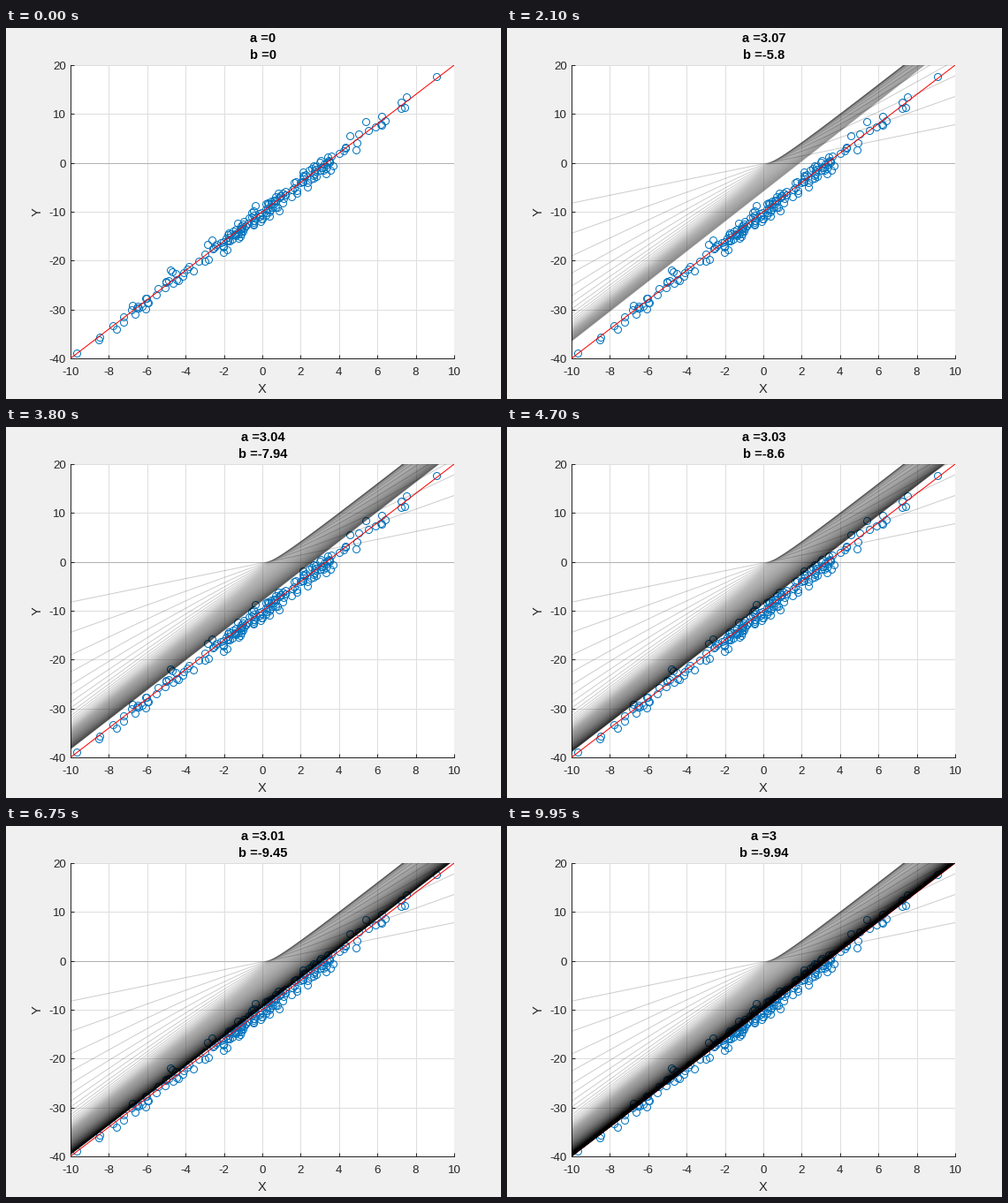
Recreate the animation shown at these times as a matplotlib script. Size 560 by 420 pixels, loop 10000 ms.

```python
import numpy as np
import matplotlib.pyplot as plt
from matplotlib.animation import FuncAnimation
from matplotlib.collections import LineCollection

W, H = 560, 420
LEFT, RIGHT, TOP, BOTTOM = 73, 507, 42, 374
PX = 0.72  # points per pixel at 100 dpi
FRAMES, INTERVAL = 200, 50
RATE = 0.02
INK = (0.15, 0.15, 0.15)
BLUE = (0, 0.447, 0.741)

plt.rcParams["font.family"] = "Liberation Sans"
fig = plt.figure(figsize=(W / 100, H / 100), dpi=100, facecolor="#f0f0f0")
ax = fig.add_axes([LEFT / W, 1 - BOTTOM / H,
                   (RIGHT - LEFT) / W, (BOTTOM - TOP) / H])
ax.set(xlim=(-10, 10), ylim=(-40, 20),
       xticks=range(-10, 11, 2), yticks=range(-40, 21, 10))
ax.set_axisbelow(True)
ax.grid(color="#dedede", linewidth=PX)
ax.tick_params(direction="in", length=4.3 * PX, width=PX, color=INK,
               labelbottom=False, labelleft=False)
for side in ("top", "right"):
    ax.spines[side].set_visible(False)
for side in ("left", "bottom"):
    ax.spines[side].set(color=INK, linewidth=PX)


def label(x, y, text, size, ha="center", **style):
    """Put text with its baseline at stage pixel (x, y)."""
    style = {"color": INK, **style}
    return fig.text(x / W, 1 - y / H, text, fontsize=size * PX, ha=ha,
                    va="baseline", rotation_mode="anchor", **style)


for v in range(-10, 11, 2):
    label(LEFT + (v + 10) / 20 * (RIGHT - LEFT), 393, str(v), 13.33)
for v in range(-40, 21, 10):
    label(68, TOP + (20 - v) / 60 * (BOTTOM - TOP) + 5, str(v), 13.33, "right")
label(290, 413, "X", 14.67)
label(40, 208.5, "Y", 14.67, rotation=90)
title_a = label(290.7, 16, "", 14.67, color="black", weight="bold")
title_b = label(290.7, 35, "", 14.67, color="black", weight="bold")


def make_samples(n=200, slope=3.0015, offset=-10.118):
    """Noisy line whose least-squares fit is exactly (slope, offset)."""
    rng = np.random.default_rng(7)
    x = rng.uniform(-1, 1, (n, 4)).sum(axis=1)  # near normal, short tails
    x = 3.566 * (x - x.mean()) / x.std() - 0.1845
    noise = rng.normal(0, 1, n)
    noise -= np.polyval(np.polyfit(x, noise, 1), x)
    return x, slope * x + offset + noise


def descend(x, y):
    """Gradient descent on the line y = a x + b, starting from zero."""
    a = b = 0.0
    path = []
    for _ in range(FRAMES):
        path.append((a, b))
        error = y - a * x - b
        a += RATE * np.mean(error * x)
        b += RATE * np.mean(error)
    return path


xs, ys = make_samples()
fits = descend(xs, ys)
segments = [[(-10, b - 10 * a), (10, b + 10 * a)] for a, b in fits]

ax.plot(xs, ys, "o", markersize=8 * PX, markerfacecolor="none",
        markeredgecolor=BLUE, markeredgewidth=PX, zorder=3)
ax.plot([-10, 10], [-40, 20], color="red", linewidth=PX, zorder=4)
trail = LineCollection([], colors=[(0, 0, 0, 0.2)], linewidths=PX, zorder=5)
ax.add_collection(trail, autolim=False)


def update(i):
    a, b = fits[i]
    trail.set_segments(segments[:i + 1])
    title_a.set_text(f"a ={round(a, 2):g}")
    title_b.set_text(f"b ={round(b, 2):g}")
    return trail, title_a, title_b


anim = FuncAnimation(fig, update, frames=FRAMES, interval=INTERVAL,
                     repeat=True, repeat_delay=0, blit=False)
plt.show()
```
